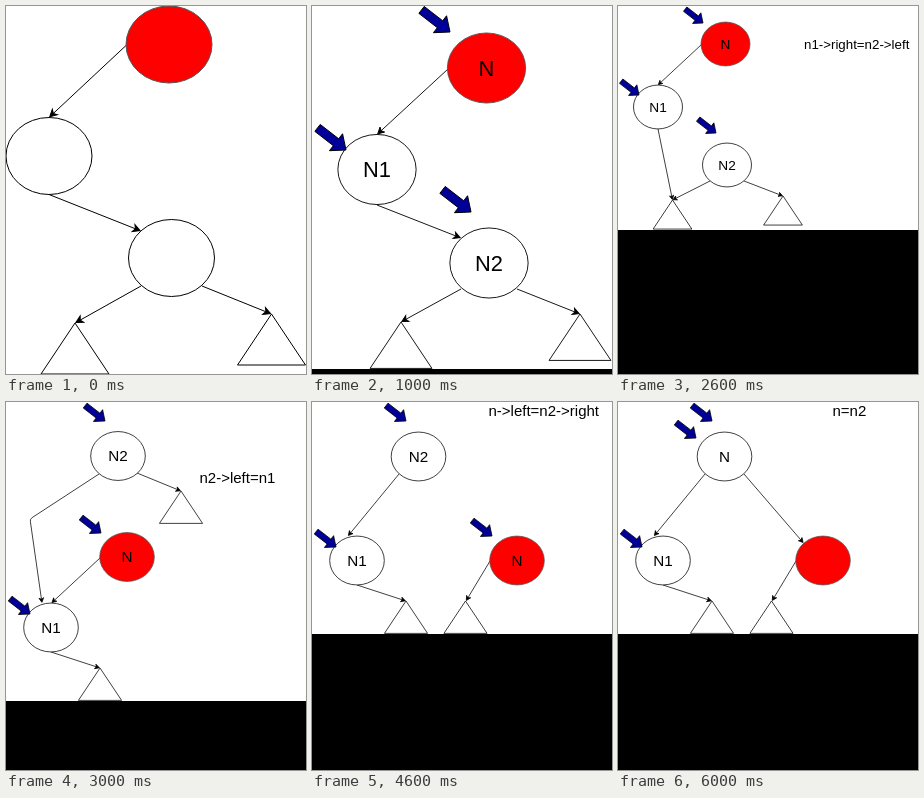
Animation, 300 px wide and 368 px high, one loop 7 s. Source, as an HTML page with a canvas:

```html
<!DOCTYPE html>
<html lang="en">
<head>
<meta charset="utf-8">
<title>Tree rotation</title>
<style>
  html, body { margin: 0; height: 100%; overflow: hidden; background: #fff; }
  canvas { display: block; }
</style>
</head>
<body>
<canvas id="stage" width="300" height="368"></canvas>
<script>
const ctx = document.getElementById('stage').getContext('2d');
const SLIDE_MS = 1000;
let scale = 1;

function shape(points, fill) {
  ctx.beginPath();
  points.forEach(p => ctx.lineTo(...p));
  ctx.closePath();
  if (fill) {
    ctx.fillStyle = fill;
    ctx.fill();
  }
  ctx.stroke();
}

function text(str, x, y, size, align = 'left') {
  ctx.font = `${size}px "Liberation Sans", Arial, sans-serif`;
  ctx.textAlign = align;
  ctx.fillStyle = '#000';
  ctx.fillText(str, x, y);
}

function node(x, y, label = '', red = false) {
  ctx.beginPath();
  ctx.ellipse(x, y, 43 * scale, 38.5 * scale, 0, 0, Math.PI * 2);
  ctx.fillStyle = red ? '#f00' : '#fff';
  ctx.fill();
  ctx.strokeStyle = red ? '#555' : '#000';
  ctx.stroke();
  ctx.strokeStyle = '#000';
  text(label, x, y + 8.6 * scale, 24 * scale, 'center');
}

const redNode = (x, y, label) => node(x, y, label, true);

function leaf(x, y) {
  const half = 34 * scale, base = y + 51 * scale;
  shape([[x, y], [x + half, base], [x - half, base]]);
}

// Draws a shape whose tip is at the origin, pointing along +x.
function atTip(x, y, angle, size, points, fill) {
  ctx.save();
  ctx.translate(x, y);
  ctx.rotate(angle);
  shape(points.map(([px, py]) => [px * size, py * size]), fill);
  ctx.restore();
}

// A link runs straight, or through a rounded bend.
function link(x1, y1, x2, y2, bend) {
  const [fromX, fromY] = bend || [x1, y1];
  ctx.beginPath();
  ctx.moveTo(x1, y1);
  if (bend) ctx.arcTo(...bend, x2, y2, 4);
  const angle = Math.atan2(y2 - fromY, x2 - fromX);
  ctx.lineTo(x2 - 5 * scale * Math.cos(angle), y2 - 5 * scale * Math.sin(angle));
  ctx.stroke();
  atTip(x2, y2, angle, scale, [[-1, 0], [-8, -3.7], [-6, 0], [-8, 3.7]], '#000');
}

function pointer(x, y) {
  atTip(x, y, 0.66, scale * 1.07,
    [[0, 0], [-13, -11], [-13, -4.5], [-37, -4.5], [-37, 4.5], [-13, 4.5], [-13, 11]], '#000099');
}

function rotatedTree(rootLabel, redLabel, joined) {
  link(87, 72, 36, 134);
  link(45, 183, 94, 199);
  link(178, 159, 154, 199);
  if (joined) link(126, 72, 185.5, 141);
  node(106.5, 54.5, rootLabel);
  node(45, 158.5, 'N1');
  redNode(205, 158.5, redLabel);
  leaf(94, 199);
  leaf(153.5, 199);
  pointer(94, 19);
  pointer(24, 145);
}

// Each slide: drawing scale, height of the white area, drawing routine.
const slides = [
  [1, 368, () => {
    link(120, 39.5, 43, 111.5);
    link(43, 188.5, 135, 225);
    link(135, 280, 69, 317);
    link(196, 280, 265.5, 308);
    redNode(163, 38.5);
    node(43, 150);
    node(165.5, 252);
    leaf(69, 317);
    leaf(265.5, 308);
  }],
  [0.91, 363, () => {
    link(136, 63, 65, 128.5);
    link(65, 199, 149, 232);
    link(149, 283, 89, 316);
    link(205, 283, 268, 308);
    redNode(174.5, 62, 'N');
    node(65, 163.5, 'N1');
    node(177, 257, 'N2');
    leaf(89, 316);
    leaf(268, 308);
    pointer(138, 26);
    pointer(34, 144);
    pointer(159, 206);
  }],
  [0.57, 224, () => {
    link(83, 39, 40, 79);
    link(40, 123, 54.5, 194);
    link(92, 175, 54.5, 194);
    link(126, 175, 165, 190);
    redNode(107.5, 38, 'N');
    node(40, 101, 'N1');
    node(109, 159, 'N2');
    leaf(54.5, 194);
    leaf(165, 190);
    pointer(85, 17);
    pointer(21, 89);
    pointer(98, 127);
    text('n1->right=n2->left', 186, 43, 13.3);
  }],
  [0.635, 299, () => {
    link(93, 72, 36, 201, [24, 117]);
    link(131, 71, 175, 89);
    link(94, 156, 45.5, 201);
    link(45, 250, 94, 266);
    node(112, 54, 'N2');
    redNode(121, 155, 'N');
    node(45, 225.5, 'N1');
    leaf(175, 89);
    leaf(94, 266);
    pointer(99, 19);
    pointer(95, 131);
    pointer(24, 212);
    text('n2->left=n1', 193.5, 81, 15);
  }],
  [0.635, 232, () => {
    rotatedTree('N2', 'N', false);
    pointer(180, 134);
    text('n->left=n2->right', 176.5, 14, 15);
  }],
  [0.635, 232, () => {
    rotatedTree('N2', 'N', true);
    pointer(207, 120);
    text('n2->right=n', 193, 14, 15);
  }],
  [0.635, 232, () => {
    rotatedTree('N', '', true);
    pointer(78, 36);
    text('n=n2', 214.5, 14, 15);
  }],
];

function render(now) {
  const [size, whiteHeight, draw] = slides[Math.floor(now / SLIDE_MS) % slides.length];
  scale = size;
  ctx.fillStyle = '#fff';
  ctx.fillRect(0, 0, 300, 368);
  ctx.strokeStyle = '#000';
  ctx.lineWidth = Math.max(0.75, scale);
  draw();
  ctx.fillStyle = '#000';
  ctx.fillRect(0, whiteHeight, 300, 368 - whiteHeight);
}

const start = performance.now();
function tick() {
  render(performance.now() - start);
  requestAnimationFrame(tick);
}
tick();
</script>
</body>
</html>
```
